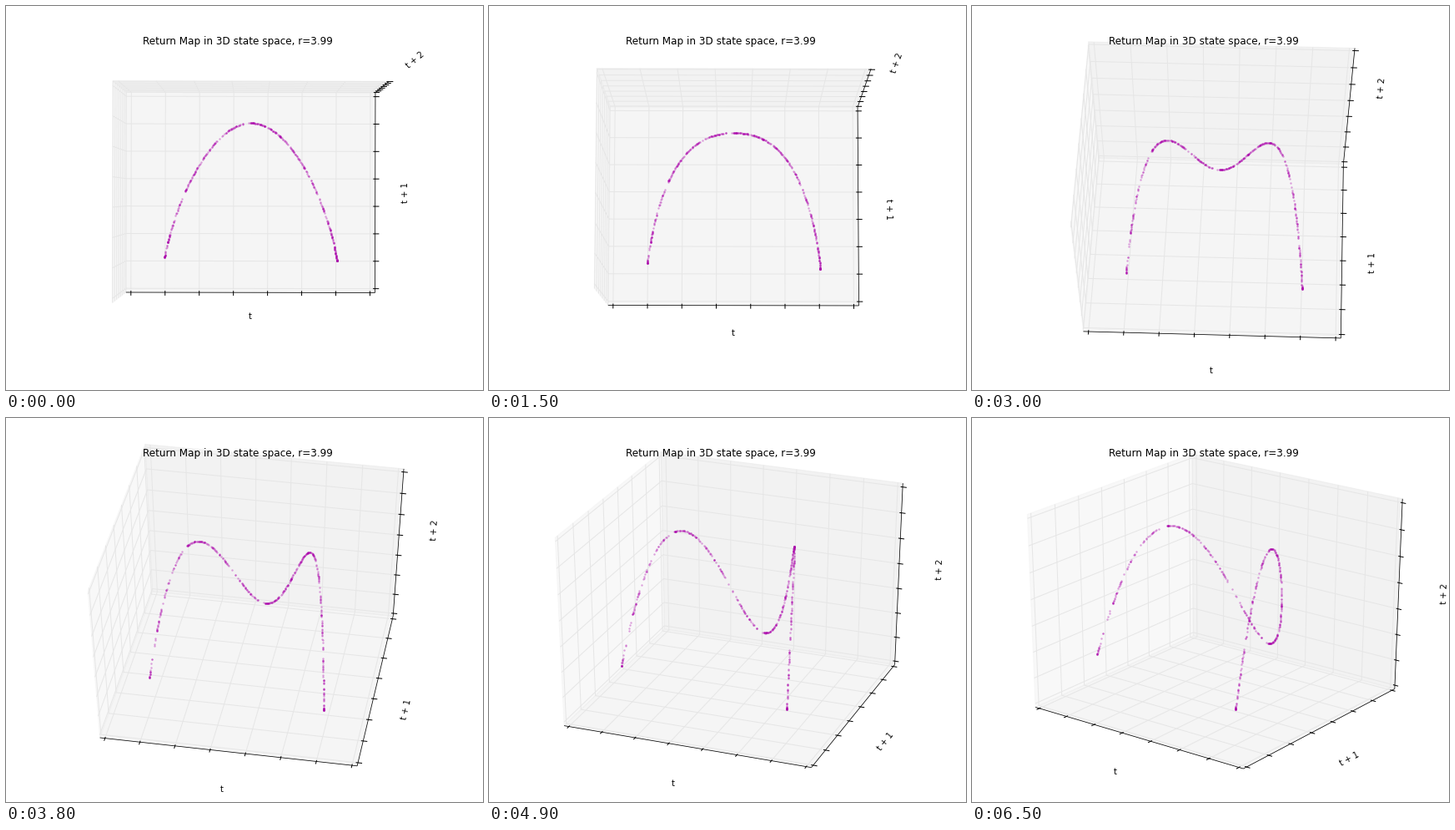
Write a matplotlib script that moves like this. It is 572 px wide and 460 px high and loops after 7500 ms.

```python
import numpy as np
import matplotlib.pyplot as plt
from matplotlib.animation import FuncAnimation
from matplotlib.collections import LineCollection, PolyCollection

W, H, DPI = 572, 460, 64
PT = 72 / DPI                      # points per pixel
CENTER = np.array([293.4, 223.2])
SCALE = np.array([3016.0, -2420.0])
DIST = 10
EDGE = 0.5 + 1 / 48                # half size of the padded unit cube
LABEL = EDGE + 1.6 / 12            # distance of the axis labels
TICK_OUT, TICK_IN = 0.2 / 12, 0.1 / 12
TICKS = np.linspace(-0.5, 0.5, 8)
LOW, HIGH = -0.2, 1.2
MOVES = 55

plt.rcParams["font.family"] = "DejaVu Sans"


def logistic_orbit(rate, count, x=0.5):
    orbit = []
    for _ in range(count):
        orbit.append(x)
        x = x * rate * (1 - x)
    return np.array(orbit)


def camera(step):
    """Elevation and turn in degrees: tilt down first, then rotate as well."""
    elev = np.interp(step, [0, 5, 16, 20, 28, 39, 42, MOVES],
                     [89.9, 82.4, 64.8, 58.1, 45.7, 28.7, 24.7, 24.6])
    return elev, 0.1 + max(0, step - 18)


def projector(elev, turn):
    e, a = np.radians([elev, turn])
    s, c, sa, ca = np.sin(e), np.cos(e), np.sin(a), np.cos(a)
    screen = np.array([[ca, sa, 0], [-s * sa, s * ca, c]])
    toward = np.array([c * sa, -c * ca, s])

    def project(points):
        points = np.asarray(points, float)
        depth = DIST - points @ toward
        return CENTER + SCALE * (points @ screen.T) / depth[..., None]
    return project


E = EDGE
PANES = np.array([
    [(-E, -E, -E), (-E, E, -E), (-E, E, E), (-E, -E, E)],
    [(-E, E, -E), (E, E, -E), (E, E, E), (-E, E, E)],
    [(-E, -E, -E), (E, -E, -E), (E, E, -E), (-E, E, -E)],
])
PANE_COLORS = [(g, g, g, 0.5) for g in (0.95, 0.90, 0.925)]

GRID = np.array(
    [[(t, -E, -E), (t, E, -E), (t, E, E)] for t in TICKS]
    + [[(-E, t, E), (-E, t, -E), (E, t, -E)] for t in TICKS]
    + [[(-E, -E, t), (-E, E, t), (E, E, t)] for t in TICKS])

AXES = np.array([
    [(-E, -E, -E), (E, -E, -E)],
    [(E, -E, -E), (E, E, -E)],
    [(E, E, -E), (E, E, E)],
])

OUT, IN = E + TICK_OUT, E - TICK_IN
TICK_MARKS = np.array(
    [[(t, -IN, -E), (t, -OUT, -E)] for t in TICKS]
    + [[(IN, t, -E), (OUT, t, -E)] for t in TICKS]
    + [[(IN, E, t), (OUT, E, t)] for t in TICKS])

LABEL_SPOTS = np.array([(0, -LABEL, -LABEL), (LABEL, 0, -LABEL),
                        (LABEL, LABEL, 0)])

orbit = logistic_orbit(3.99, 452)
states = np.column_stack([orbit[:-2], orbit[1:-1], orbit[2:]])
states = (states - LOW) / (HIGH - LOW) - 0.5

fig = plt.figure(figsize=(W / DPI, H / DPI), dpi=DPI, facecolor="white")
ax = fig.add_axes([0, 0, 1, 1])
ax.set(xlim=(0, W), ylim=(H, 0))
ax.axis("off")


def add_lines(color, width, zorder):
    return ax.add_collection(LineCollection(
        [], colors=color, linewidths=width * PT, zorder=zorder))


panes = ax.add_collection(PolyCollection(
    [], facecolors=PANE_COLORS, edgecolors=PANE_COLORS,
    linewidths=PT, zorder=1))
grid = add_lines("0.9", 1, 2)
axis_lines = add_lines("black", 0.75, 3)
tick_marks = add_lines("black", 1, 3)
dots = ax.scatter([], [], s=(2.4 * PT) ** 2, color="#aa00aa", alpha=0.36,
                  linewidths=0, zorder=4)
labels = [ax.text(0, 0, text, fontsize=10 * PT, ha="center", va="center",
                  zorder=5) for text in ("t", "t + 1", "t + 2")]
ax.text(278, 46, "Return Map in 3D state space, r=3.99",
        fontsize=12 * PT, ha="center", va="baseline", zorder=6)


def upright_angle(start, end):
    dx, dy = end - start
    angle = np.degrees(np.arctan2(-dy, dx)) % 180
    return angle - 180 if angle > 90 else angle


def update(frame):
    project = projector(*camera(min(max(frame - 10, 0), MOVES)))
    panes.set_verts(project(PANES))
    grid.set_segments(project(GRID))
    edges = project(AXES)
    axis_lines.set_segments(edges)
    tick_marks.set_segments(project(TICK_MARKS))
    dots.set_offsets(project(states))
    for label, spot in zip(labels, project(LABEL_SPOTS)):
        label.set_position(spot)
    for label, edge in zip(labels[1:], edges[1:]):
        label.set_rotation(upright_angle(*edge))
    return []


anim = FuncAnimation(fig, update, frames=75, interval=100, repeat=True,
                     repeat_delay=0)
plt.show()
```
